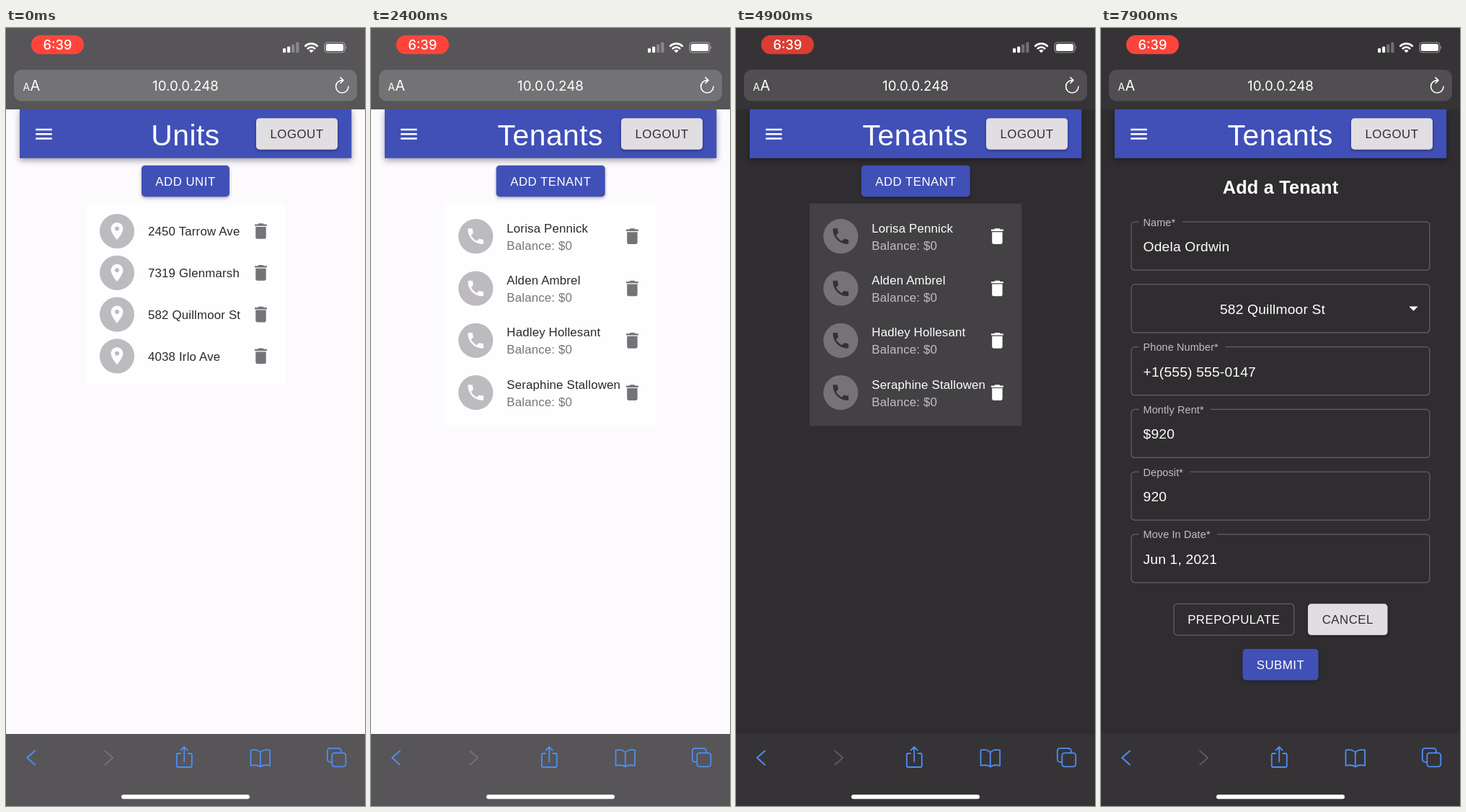
Recreate the animation shown at these times as an HTML page. Size 498 by 1080 pixels, loop 8000 ms.

```html
<!DOCTYPE html>
<html lang="en">
<head>
<meta charset="utf-8">
<title>Rental manager</title>
<style>
html, body { margin: 0; width: 100%; height: 100%; overflow: hidden; }
svg {
  display: block; width: 498px; height: 1080px;
  font-family: "Liberation Sans", Arial, sans-serif;
  --page: #fcfafd; --bar: #575558; --url: #737275; --paper: #fffeff;
  --ink: #29272a; --soft: #767477; --icon: #757377;
  --avatar: #bdbbbf; --glyph: #fdfcfe; --off: #737174;
}
svg.dark {
  --page: #302d30; --bar: #363336; --url: #504e51; --paper: #434144;
  --ink: #fff; --soft: #c1bfc2; --icon: #fff;
  --avatar: #757376; --glyph: #353235; --off: #5b595c;
}
.sys { font-family: Inter, Roboto, sans-serif; fill: #fff; }
.title { font-size: 40.9px; letter-spacing: .45px; fill: #fff; }
.head { font-size: 25.3px; font-weight: bold; letter-spacing: .18px; fill: #fff; }
.body { font-size: 19.25px; letter-spacing: .18px; }
.list { font-size: 16.84px; letter-spacing: .18px; }
.btn { font-size: 16.84px; letter-spacing: .48px; }
.mid { text-anchor: middle; }
.ink { fill: var(--ink); }
.soft { fill: var(--soft); }
.line { fill: none; stroke-linecap: round; stroke-linejoin: round; }
.box { fill: none; stroke: #646265; stroke-width: 1.2; }
.raised { filter: drop-shadow(0 2px 2px rgba(0,0,0,.3)); }
.header { filter: drop-shadow(0 3px 4px rgba(0,0,0,.38)); }
#menu .panel { filter: drop-shadow(0 2px 2px rgba(0,0,0,.34)); }
</style>
</head>
<body>
<svg id="stage" viewBox="0 0 498 1080"></svg>
<script>
const LOOP = 8000, STEP = 100;
const BLUE = '#4050b7', GREY = '#e0dee1';

const ICON = {
  pin: 'M12 2C8.13 2 5 5.13 5 9c0 5.25 7 13 7 13s7-7.75 7-13c0-3.87-3.13-7-7-7zm0 9.5a2.5 2.5 0 1 1 0-5 2.5 2.5 0 0 1 0 5z',
  phone: 'M6.62 10.79c1.44 2.83 3.76 5.14 6.59 6.59l2.2-2.2c.27-.27.67-.36 1.02-.24 1.12.37 2.33.57 3.57.57.55 0 1 .45 1 1V20c0 .55-.45 1-1 1-9.39 0-17-7.61-17-17 0-.55.45-1 1-1h3.5c.55 0 1 .45 1 1 0 1.25.2 2.45.57 3.57.11.35.03.74-.25 1.02z',
  bin: 'M6 19c0 1.1.9 2 2 2h8c1.1 0 2-.9 2-2V7H6zM19 4h-3.5l-1-1h-5l-1 1H5v2h14z',
  bars: 'M3 18h18v-2H3zm0-5h18v-2H3zm0-7v2h18V6z',
  sun: 'M20 8.69V4h-4.69L12 .69 8.69 4H4v4.69L.69 12 4 15.31V20h4.69L12 23.31 15.31 20H20v-4.69L23.31 12zM12 18a6 6 0 1 1 0-12 6 6 0 0 1 0 12zm0-10a4 4 0 1 0 0 8 4 4 0 0 0 0-8z'
};

const text = (x, y, cls, str, extra = '') =>
  `<text x="${x}" y="${y}" class="${cls}" ${extra}>${str}</text>`;
const rect = (x, y, w, h, r, attrs) =>
  `<rect x="${x}" y="${y}" width="${w}" height="${h}" rx="${r}" ${attrs}/>`;
const icon = (name, x, y, fill, size = 1.203) =>
  `<path d="${ICON[name]}" fill="${fill}" fill-rule="evenodd" transform="translate(${x} ${y}) scale(${size}) translate(-12 -12)"/>`;
const stroke = (d, color, width) =>
  `<path class="line" d="${d}" stroke="${color}" stroke-width="${width}"/>`;
const button = (x, y, w, label, fill, ink) =>
  rect(x, y, w, 43.5, 4.8, fill ? `fill="${fill}" class="raised"` : 'class="box"') +
  text(x + w / 2, y + 28, 'btn mid', label, `fill="${ink}"`);
const avatar = (name, x, y) =>
  `<circle cx="${x}" cy="${y}" r="24.1" fill="var(--avatar)"/>` + icon(name, x, y, 'var(--glyph)');

const units = ['2450 Tarrow Ave', '7319 Glenmarsh', '582 Quillmoor St', '4038 Irlo Ave'];
const tenants = ['Lorisa Pennick', 'Alden Ambrel', 'Hadley Hollesant', 'Seraphine Stallowen'];
const fields = [
  ['Name*', 'Odela Ordwin'],
  ['', '582 Quillmoor St'],
  ['Phone Number*', '+1(555) 555-0147'],
  ['Montly Rent*', '$920'],
  ['Deposit*', '920'],
  ['Move In Date*', 'Jun 1, 2021']
];

const unitsPage = () =>
  text(249, 163, 'title mid', 'Units') +
  button(188, 190.7, 122, 'ADD UNIT', BLUE, '#fff') +
  rect(111, 244, 276, 250, 0, 'fill="var(--paper)"') +
  units.map((name, i) => {
    const y = 282 + i * 57.8;
    return avatar('pin', 154, y) + text(197, y + 6.4, 'list ink', name) +
      icon('bin', 353.5, y, 'var(--icon)');
  }).join('');

const tenantList = () =>
  button(173.7, 190.7, 151, 'ADD TENANT', BLUE, '#fff') +
  rect(102, 243.7, 294.3, 308.5, 0, 'fill="var(--paper)"') +
  tenants.map((name, i) => {
    const y = 289.2 + i * 72.3;
    return avatar('phone', 145.3, y) + text(188.3, y - 5.6, 'list ink', name) +
      text(188.3, y + 18.4, 'list soft', 'Balance: $0') + icon('bin', 362.4, y, 'var(--icon)');
  }).join('');

const field = ([label, value], i) => {
  const y = 269.2 + i * 86.75;
  const box = rect(42, y, 414, 67, 4.8, 'class="box"');
  if (!label) {
    return box + text(238, y + 41, 'body mid value', value, 'fill="#fff"') +
      `<path d="M427.3 ${y + 30.5}h12.4l-6.2 6.2z" fill="#fff"/>`;
  }
  return box + rect(52.5, y - 2, 0, 4, 0, 'class="notch" fill="var(--page)"') +
    `<g class="label" data-y="${y}">${text(0, 0, 'body soft', label)}</g>` +
    text(58.5, y + 41, 'body value', value, 'fill="#fff"');
};

const form = () =>
  text(249, 229.5, 'head mid', 'Add a Tenant') + fields.map(field).join('') +
  button(101, 799.3, 166.7, 'PREPOPULATE', '', '#fff') +
  button(287, 799.3, 110.5, 'CANCEL', GREY, '#302e31') +
  button(196.5, 862, 105, 'SUBMIT', BLUE, '#fff');

const menu = () =>
  rect(6, 176.3, 150.7, 308.7, 4.8, 'class="panel" fill="var(--paper)"') +
  ['Home', 'Units', 'Tenants', 'Maintenance'].map((name, i) =>
    text(25, 221.8 + i * 57.8, 'body ink', name)).join('') +
  icon('sun', 43, 446, 'var(--icon)');

const statusBar = () =>
  rect(0, 0, 498, 113, 0, 'fill="var(--bar)"') +
  rect(35, 10, 73, 26.3, 13.1, 'id="pill"') +
  text(71.5, 29.6, 'sys mid', '6:39', 'font-size="18.2" font-weight="500"') +
  [6, 8.6, 11.6, 14.6].map((h, i) =>
    rect(384 + i * 6.1, 34.3 - h, 4.1, h, 1, `class="bar" fill="#fff"`)).join('') +
  stroke('M415.2 25a12 12 0 0 1 16.6 0M418.7 28.4a7.2 7.2 0 0 1 9.6 0', '#fff', 2.7) +
  '<path d="M423.5 34.6l-3.2-3.3a4.6 4.6 0 0 1 6.4 0z" fill="#fff"/>' +
  rect(442, 20, 28, 14, 4.2, 'fill="none" stroke="#fff" stroke-opacity=".5" stroke-width="1.2"') +
  rect(443.9, 21.9, 24.2, 10.2, 2.6, 'fill="#fff"') +
  '<path d="M471.4 24.8q1.8 2.2 0 4.6z" fill="#fff" opacity=".6"/>' +
  rect(11, 58, 476, 43.4, 10.5, 'fill="var(--url)"') +
  text(23.5, 87.4, 'sys', 'A', 'font-size="14"') +
  text(33.6, 87.4, 'sys', 'A', 'font-size="20"') +
  text(249, 87, 'sys mid', '10.0.0.248', 'font-size="18.8"') +
  stroke('M475 81.3a8.7 8.7 0 1 1-8.7-8.7h1.6M464 68.9l4 3.8-4 3.8', '#fff', 1.6);

const toolBar = () => {
  const blue = '#4d8ef2';
  return rect(0, 980, 498, 100, 0, 'fill="var(--bar)"') +
    stroke('M40 1003.5l-10.8 9.6 10.8 9.6', blue, 2) +
    stroke('M137.3 1003.5l10.8 9.6-10.8 9.6', 'var(--off)', 2) +
    stroke('M242 1007h-3.2q-2 0-2 2v15q0 2 2 2h17q2 0 2-2v-15q0-2-2-2h-3.2M247.2 1018.5v-20M242.6 1002.6l4.6-4.6 4.6 4.6', blue, 1.8) +
    stroke('M352.8 1005.5q-5.5-5-13.3-3v21.5q8-2 13.3 1.5 5.300-3.500 13.3-1.5v-21.5q-7.800-2-13.3 3v20', blue, 1.8) +
    rect(445.800, 999.800, 19, 19, 3.6, `fill="none" stroke="${blue}" stroke-width="1.8"`) +
    rect(452.3, 1006.3, 19, 19, 3.6, `fill="var(--bar)" stroke="${blue}" stroke-width="1.8"`) +
    rect(160, 1064.2, 178, 6, 3, 'fill="#fff"');
};

const stage = document.getElementById('stage');
stage.innerHTML =
  rect(0, 0, 498, 1080, 0, 'fill="var(--page)"') +
  rect(19, 113, 460.3, 67.7, 0, `fill="${BLUE}" class="header"`) +
  icon('bars', 52.5, 147.2, '#fff', 1.25) +
  button(347, 125.2, 113, 'LOGOUT', GREY, '#302e31') +
  `<g id="units">${unitsPage()}</g>` +
  `<g id="title">${text(248.8, 163, 'title mid', 'Tenants')}</g>` +
  `<g id="tenants">${tenantList()}</g><g id="form">${form()}</g>` +
  `<g id="menu">${menu()}</g>` +
  '<circle id="touch" r="10.2" fill="#e4e2e5"/>' +
  statusBar() + toolBar();

const $ = id => document.getElementById(id);
const all = sel => [...stage.querySelectorAll(sel)];
const show = (el, on) => { el.style.visibility = on ? 'visible' : 'hidden'; };
const clamp = v => Math.min(1, Math.max(0, v));
const ramp = (t, from, to) => clamp((t - from) / (to - from));
const ease = k => 1 - (1 - k) ** 3;
const mix = (a, b, k) => a + (b - a) * k;

const values = all('.value'), bars = all('.bar'), notches = all('.notch');
const labels = all('.label').map((el, i) => ({
  el, y: +el.dataset.y, notch: notches[i],
  gap: el.firstChild.getComputedTextLength() * .75 + 15.5,
  pinned: i === 4
}));

// Menu open and close times
const opens = [[500, 1600], [2650, 4100]];
const PAGE = 1600, DARK = 3500, FORM = 5300, FILL = 7000;

function drawMenu(t) {
  const k = Math.max(...opens.map(([a, b]) => ease(ramp(t, a, a + 280)) * (1 - ramp(t, b, b + 200))));
  const sx = mix(.75, 1, k), sy = mix(.5625, 1, k);
  $('menu').setAttribute('transform', `translate(33 176) scale(${sx} ${sy}) translate(-33 -176)`);
  $('menu').style.opacity = k;
  show($('menu'), k > 0);
}

function drawForm(t) {
  const on = t >= FORM;
  show($('form'), on);
  values.forEach(el => show(el, on && t >= FILL));
  for (const { el, y, notch, gap, pinned } of labels) {
    const k = pinned ? 1 : ease(ramp(t, FILL - 50, FILL + 150));
    el.setAttribute('transform', `translate(58.5 ${mix(y + 41, y + 5.3, k)}) scale(${mix(1, .75, k)})`);
    notch.setAttribute('width', gap * k);
  }
}

function draw(t) {
  stage.classList.toggle('dark', t >= DARK);
  show($('units'), t < PAGE);
  show($('title'), t >= PAGE);
  show($('tenants'), t >= PAGE && t < FORM);
  drawMenu(t);
  drawForm(t);

  const k = ramp(t, 3300, 3500);
  $('touch').setAttribute('cx', mix(114, 46, k));
  $('touch').setAttribute('cy', mix(452, 447, k));
  show($('touch'), t >= 3300 && t < 3600);

  const glow = clamp(.5 + .62 * Math.cos((t - 150) * Math.PI / 1000));
  $('pill').setAttribute('fill', `rgb(${mix(217, 255, glow)},${mix(60, 69, glow)},${mix(53, 58, glow)})`);
  const signal = t >= 5600 && t < 7000 ? 1 : 2;
  bars.forEach((el, i) => el.setAttribute('fill-opacity', i < signal ? 1 : .3));
}

function tick() {
  draw(Math.floor(performance.now() % LOOP / STEP) * STEP);
  requestAnimationFrame(tick);
}
tick();
</script>
</body>
</html>
```
